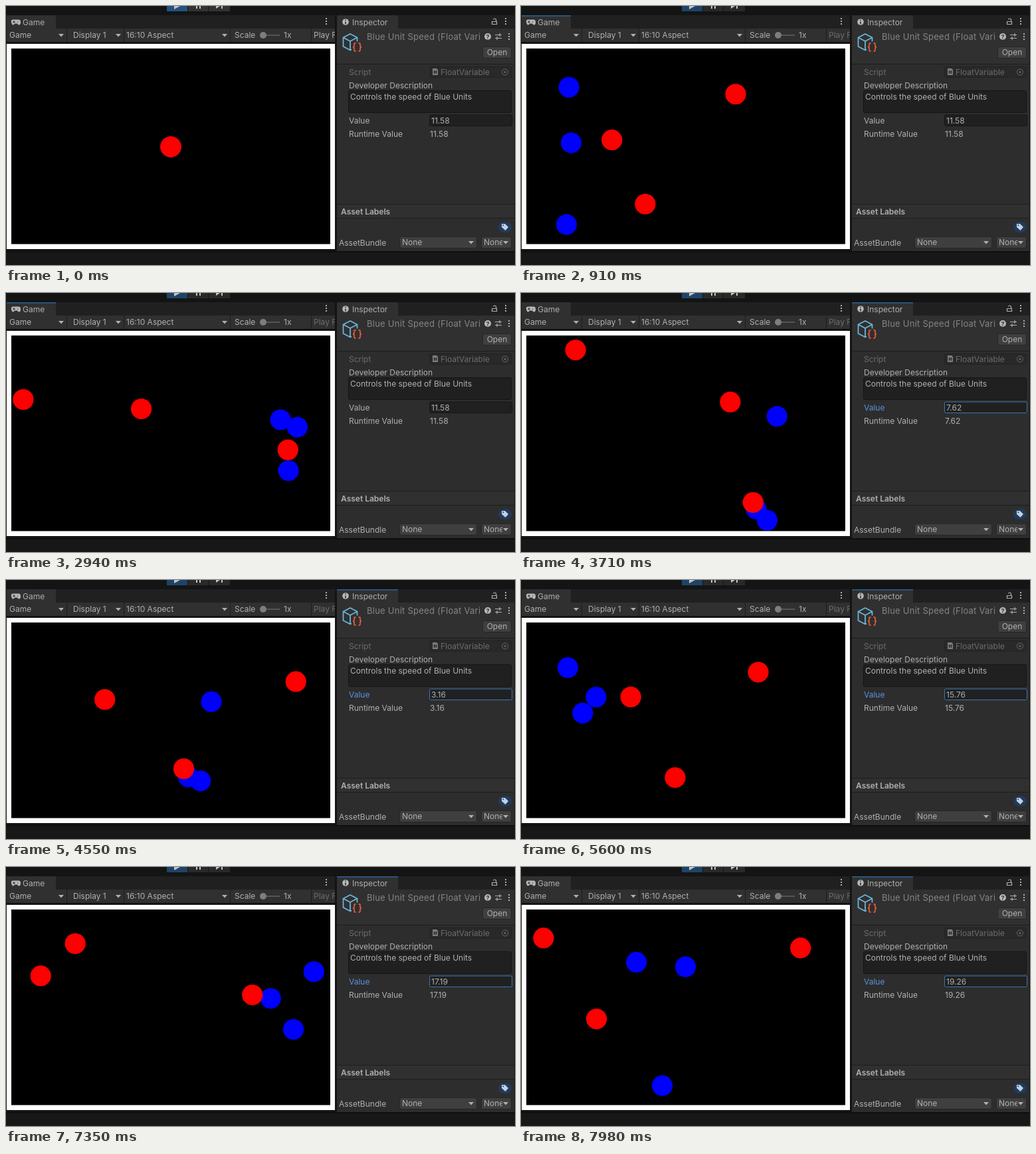
An HTML page for the animation above (8000 ms loop, 766 by 390 pixels).

```html
<!DOCTYPE html>
<html lang="en">
<head>
<meta charset="utf-8">
<title>Game view with bouncing units</title>
<style>
  html, body { margin: 0; width: 100%; height: 100%; overflow: hidden; background: #141414; }
  svg { display: block; width: 766px; height: 390px; }
  text { font: 12px Inter, sans-serif; fill: #b0b0b0; white-space: pre; }
  .dim { fill: #6c6c6c; }
  .field { fill: #202020; stroke: #151515; }
  .drop { fill: #3f3f3f; stroke: #262626; }
  .line { fill: none; stroke: #b0b0b0; stroke-width: 1.2; }
  .arrow, .dots { fill: #b0b0b0; }
  .focused .tint { fill: #1d4468; }
  .focused .button { fill: #292929; }
  .focused .fade { fill: #6c6c6c; }
  .editing #label { fill: #5c90e0; }
  .editing #valueField { stroke: #3a76b4; }
  .tabLine { fill: #2c6396; }
</style>
</head>
<body>
<svg id="stage" viewBox="0 0 766 390">
  <defs>
    <path id="arrow" class="arrow" d="M-4-2H4L0 2.500Z"/>
    <path id="dots" class="dots" d="M-1-5h2v2h-2zM-1-1h2v2h-2zM-1 3h2v2h-2z"/>
    <clipPath id="gameClip"><path d="M0 0H495V390H0Z"/></clipPath>
    <clipPath id="titleClip"><path d="M540 36H713V60H540Z"/></clipPath>
    <clipPath id="noneClip"><path d="M716 346H747V366H716Z"/></clipPath>
  </defs>

  <!-- play controls -->
  <path class="tint" fill="#245381" d="M242 0h31v8h-31z"/>
  <path class="button" fill="#333" d="M274 0h30v8h-30zM305 0h32v8h-32z"/>
  <path fill="#c4c4c4" d="M253 0h9l-9 5zM286 0h2v4h-2zM291 0h2v4h-2zM316 0h6l-6 4zM324 0h2v4h-2z"/>

  <!-- game panel -->
  <path fill="#202020" d="M1 14H495V34H1Z"/>
  <path fill="#303030" d="M1 14H75V34H1ZM1 34H495V54H1Z"/>
  <path id="gameLine" class="tabLine" d="M1 14H75V15.500H1Z"/>
  <path fill="#b8b8b8" d="M11 20.500h8q3 0 3 4t-2.500 4q-1.500 0-2.500-2h-4q-1 2-2.500 2T8 24.500t3-4z"/>
  <path stroke="#303030" d="M10 24h4m-2-2v4m5-2h1.500"/>
  <text x="25" y="29">Game</text>
  <use href="#dots" x="482" y="23"/>
  <path stroke="#1d1d1d" d="M91.500 34V54M177.500 34V54M337.500 34V54M459.500 34V54"/>
  <g clip-path="url(#gameClip)">
    <text x="5" y="48">Game</text>
    <text x="101" y="48">Display 1</text>
    <text x="181" y="48">16:10 Aspect</text>
    <text x="344" y="48">Scale</text>
    <text x="418" y="48">1x</text>
    <text class="fade" x="463" y="48">Play Focused</text>
  </g>
  <use href="#arrow" x="83" y="44"/>
  <use href="#arrow" x="169" y="44"/>
  <use href="#arrow" x="329" y="44"/>
  <path stroke="#555" stroke-width="2" d="M387 44H412"/>
  <circle cx="387" cy="44" r="5" fill="#7d7d7d"/>
  <path fill="#fff" d="M1 57H495V366H1Z"/>
  <path d="M8 64H488V358.500H8Z"/>
  <g id="balls"></g>

  <!-- inspector -->
  <path fill="#202020" d="M498 14H765V34H498Z"/>
  <path fill="#303030" d="M498 14H590V34H498ZM498 34H765V87H498Z"/>
  <path fill="#2d2d2d" d="M498 87H765V369H498Z"/>
  <path id="inspectorLine" class="tabLine" d="M498 14H590V15.500H498Z"/>
  <circle cx="511" cy="24" r="4.800" fill="#b8b8b8"/>
  <path stroke="#303030" stroke-width="1.600" d="M511 20.500v1.600m0 1.400v4"/>
  <text x="521" y="29">Inspector</text>
  <path class="line" d="M731.500 23.500h7v4h-7zM737.500 23v-2q0-2-2-2t-2 1.500"/>
  <use href="#dots" x="752" y="23"/>

  <path fill="none" stroke="#6bb5d8" stroke-width="1.800" stroke-linejoin="round"
    d="M520 65.500l-2 1-10.500-5.500V47.500L518 42l10.500 5.500v6M507.500 47.500L518 53l10.500-5.500M518 53v13"/>
  <path fill="none" stroke="#e0573c" stroke-width="1.800"
    d="M526.500 56h-1q-1.500 0-1.500 1.500v2.500q0 2-2 2q2 0 2 2v2.500q0 1.500 1.500 1.500h1M530.500 56h1q1.500 0 1.500 1.500v2.500q0 2 2 2q-2 0-2 2v2.500q0 1.500-1.500 1.500h-1"/>
  <g clip-path="url(#titleClip)">
    <text x="543" y="51" style="font-size:13px;letter-spacing:.25px;fill:#858585">Blue Unit Speed (Float Variable)</text>
  </g>
  <circle cx="725" cy="46" r="5" fill="#b8b8b8"/>
  <text x="725" y="49.500" text-anchor="middle" style="font-size:9px;font-weight:700;fill:#303030">?</text>
  <path class="line" d="M736 43.500h10M736 48.500h10M743 41v5M739 46v5"/>
  <use href="#dots" x="757" y="46"/>
  <rect class="drop" x="717.500" y="61.500" width="43" height="17" rx="3"/>
  <text x="739" y="74" text-anchor="middle">Open</text>
  <path stroke="#1d1d1d" d="M498 87.500H765"/>

  <text class="dim" x="516" y="104">Script</text>
  <rect x="637.500" y="91.500" width="123" height="16" rx="2" fill="#292929" stroke="#222"/>
  <path fill="#7c7c7c" d="M642 94h6l2 2v8h-8z"/>
  <path stroke="#2a2a2a" d="M644.500 97v5m3-5v5m-4-3.500h5m-5 2h5"/>
  <text class="dim" x="654" y="104">FloatVariable</text>
  <circle cx="751" cy="99.500" r="4.500" fill="none" stroke="#666"/>
  <circle cx="751" cy="99.500" r="1.500" fill="#666"/>
  <text x="516" y="124">Developer Description</text>
  <rect class="field" x="515.500" y="127.500" width="245" height="33" rx="2"/>
  <text x="518" y="141">Controls the speed of Blue Units</text>
  <text id="label" x="516" y="177">Value</text>
  <rect id="valueField" class="field" x="637.500" y="164" width="124" height="16.500" rx="2"/>
  <text id="value" x="640" y="177"></text>
  <text x="516" y="197">Runtime Value</text>
  <text id="runtime" x="638" y="197"></text>

  <path fill="#303030" d="M498 299H765V320H498Z"/>
  <path stroke="#1d1d1d" d="M498 298.500H765M498 319.500H765"/>
  <text x="504" y="314" style="font-weight:600">Asset Labels</text>
  <rect x="741" y="325" width="20" height="16" rx="8" fill="#213a5c"/>
  <path fill="#c4d0e0" d="M746 328h5l5 5-4.500 5-5.500-5z"/>
  <circle cx="748.300" cy="330.300" r="1" fill="#213a5c"/>
  <text x="501" y="361">AssetBundle</text>
  <rect class="drop" x="592.500" y="347.500" width="116" height="17" rx="3"/>
  <text x="596" y="360">None</text>
  <use href="#arrow" x="700" y="356"/>
  <rect class="drop" x="715.500" y="347.500" width="45" height="17" rx="3"/>
  <g clip-path="url(#noneClip)"><text x="719" y="360">None</text></g>
  <use href="#arrow" x="752" y="356"/>

  <path fill="#0f0f0f" d="M0 369H766V371H0Z"/>
  <path fill="#171717" d="M0 371H766V390H0Z"/>
</svg>
<script>
const LOOP = 8000, STEP = 70;
const START = { x: 248, y: 212 };
const WALLS = { left: 23.5, right: 472.5, top: 80, bottom: 343 };
const BLUE_DELAY = 117, RED_DELAY = 140, EDIT_TIME = 3150;
const SPEED_SCALE = 0.085;

// [time in ms, speed value], linear in between
const speedKeys = [
  [BLUE_DELAY, 11.58], [EDIT_TIME, 11.58], [4340, 3.16], [4550, 3.16], [5520, 15.76],
  [5600, 15.76], [6000, 16.9], [6400, 16.7], [7200, 16.7], [7980, 19.26]
];

// velocities in px/s; blue ones are scaled by the speed value
const units = [
  { color: "#00f", vx: -225.3, vy: -115 },
  { color: "#00f", vx: -230.1, vy: 185.7 },
  { color: "#00f", vx: -221, vy: -7.6 },
  { color: "#f00", vx: 97.4, vy: -102.9 },
  { color: "#f00", vx: -79.3, vy: 112 },
  { color: "#f00", vx: -144.5, vy: -13.4 }
];

const byId = id => document.getElementById(id);
const stage = byId("stage");

for (const unit of units) {
  unit.node = document.createElementNS("http://www.w3.org/2000/svg", "circle");
  unit.node.setAttribute("r", 15.6);
  unit.node.setAttribute("fill", unit.color);
  byId("balls").append(unit.node);
}

// Reflects an unbounded coordinate back and forth between two walls.
function bounce(position, low, high) {
  const span = high - low;
  const phase = (((position - low) % (2 * span)) + 2 * span) % (2 * span);
  return low + (phase < span ? phase : 2 * span - phase);
}

// Current speed value and the path time accumulated under it.
function blueState(time) {
  let value = speedKeys[0][1], area = 0;
  for (let i = 1; i < speedKeys.length; i++) {
    const [t0, v0] = speedKeys[i - 1], [t1, v1] = speedKeys[i];
    if (time <= t0) break;
    const end = Math.min(time, t1);
    value = v0 + (v1 - v0) * (end - t0) / (t1 - t0);
    area += (v0 + value) / 2 * (end - t0) / 1000;
  }
  return { value, travel: area * SPEED_SCALE };
}

function draw(now) {
  const time = Math.floor(now % LOOP / STEP) * STEP;
  const blue = blueState(time);
  const redTravel = Math.max(0, time - RED_DELAY) / 1000;
  for (const { color, vx, vy, node } of units) {
    const travel = color === "#00f" ? blue.travel : redTravel;
    node.setAttribute("cx", bounce(START.x + vx * travel, WALLS.left, WALLS.right));
    node.setAttribute("cy", bounce(START.y + vy * travel, WALLS.top, WALLS.bottom));
  }

  const editing = time >= EDIT_TIME, focused = time >= STEP;
  stage.classList.toggle("focused", focused);
  stage.classList.toggle("editing", editing);
  byId("gameLine").style.opacity = focused && !editing ? 1 : 0;
  byId("inspectorLine").style.opacity = editing ? 1 : 0;
  byId("value").textContent = byId("runtime").textContent = String(+blue.value.toFixed(2));
}

function tick() {
  draw(performance.now());
  requestAnimationFrame(tick);
}
tick();
</script>
</body>
</html>
```
